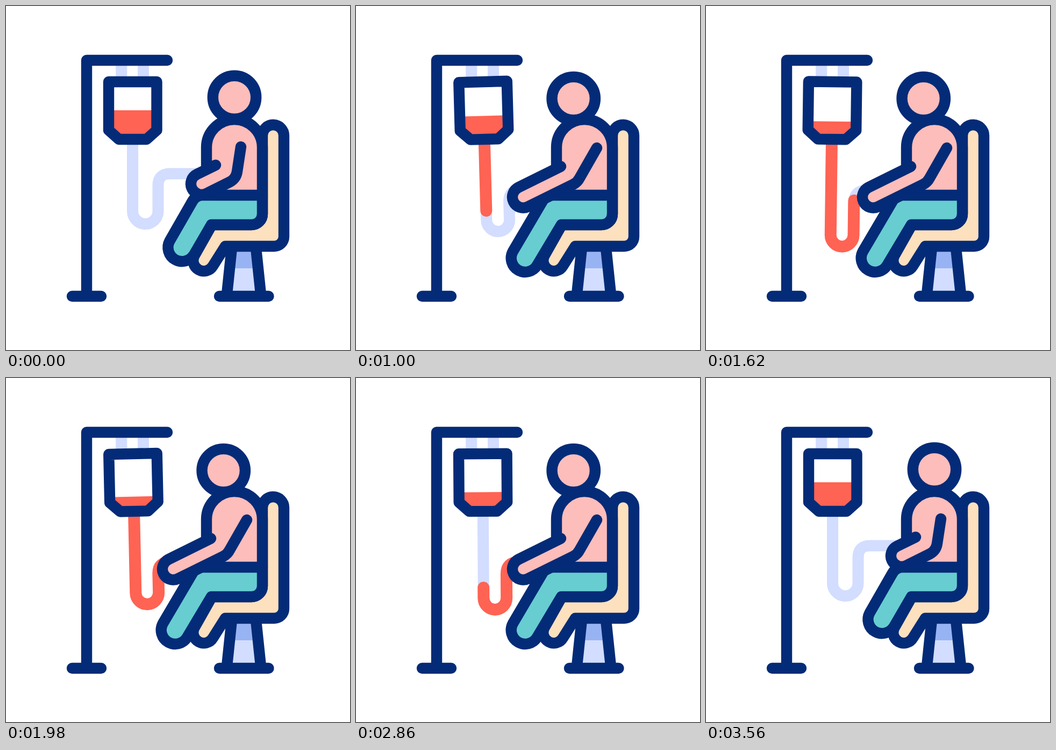
Animation, 640 px wide and 640 px high, one loop 3.6 s. Source, as an HTML page:

```html
<!DOCTYPE html>
<html lang="en">
<head>
<meta charset="utf-8">
<title>Infusion</title>
<style>
  html, body { margin: 0; width: 100%; height: 100%; overflow: hidden; background: #fff; }
  svg { display: block; width: 100vw; height: 100vh; }
  .line { stroke: #042b77; stroke-width: 20.4; stroke-linecap: round; stroke-linejoin: round; fill: none; }
  .pink { fill: #fdbdba; }
  .teal { fill: #67cdd1; }
  .cream { fill: #fde0bd; }
  .hose { fill: none; stroke: #d2ddff; stroke-width: 21; }
  .blood { stroke: #ff6353; stroke-width: 22; stroke-linecap: round; }
</style>
</head>
<body>
<svg viewBox="0 0 640 640">
  <defs>
    <path id="bagShape" d="M191 141H280.5V231L261.5 248H210L191 231Z"/>
    <clipPath id="bagClip"><use href="#bagShape"/></clipPath>
  </defs>

  <path class="hose" d="M214.7 101V145M255.5 101V145"/>
  <path class="line" d="M123 540H177M150 540V101H300"/>

  <path fill="#d2ddff" d="M420 450H465L474 540H411Z"/>
  <path fill="#98b3f3" d="M420 450H465L469 488H416Z"/>
  <path class="line" d="M420 450L411 536M465 450L474 536M397 540H488.5"/>
  <path class="line cream" d="M477 241A20 20 0 0 1 517 241V429A18 18 0 0 1 499 447H408L385 483.5A19.5 19.5 0 0 1 351 463.5L383 407H457A20 20 0 0 0 477 387Z"/>

  <path class="hose" id="tube"/>
  <path class="hose blood" id="flow" pathLength="1"/>

  <g id="bag">
    <use href="#bagShape" fill="#fff"/>
    <g clip-path="url(#bagClip)"><rect id="level" x="180" width="112" height="80" fill="#ff6353"/></g>
    <use href="#bagShape" class="line"/>
  </g>

  <path class="pink" d="M373 298V263A52 52 0 0 1 477 263V352H400L373 320Z"/>
  <path class="line teal" id="leg"/>
  <path class="line" d="M373 298V263A52 52 0 0 1 477 263V352"/>
  <path class="line pink" id="arm"/>
  <circle class="line pink" id="head" r="40.2"/>
</svg>
<script>
const LOOP = 3600, PIVOT = { x: 236, y: 130 };
const el = id => document.getElementById(id);
const set = (id, attrs) => {
  for (const k in attrs) el(id).setAttribute(k, attrs[k]);
};
const mix = (a, b, p) => a + (b - a) * p;
const ramp = (t, from, to) => Math.min(1, Math.max(0, (t - from) / (to - from)));
const ease = (t, from, to) => (1 - Math.cos(Math.PI * ramp(t, from, to))) / 2;

// One wave drives both the swing of the bag and the sag of the tube.
const wave = t => Math.cos(2 * Math.PI * (t - 518) / 1024);

function swing(t) {
  const size = 1.5 + 0.7 * Math.cos(2 * Math.PI * (t - 540) / 2000);
  return size * wave(t) * ease(t, 0, 400) * (1 - ease(t, 2700, 3400));
}

function drawTube(t, deg, p) {
  const a = deg * Math.PI / 180, c = Math.cos(a), s = Math.sin(a);
  const rot = (x, y) => {
    const dx = x - PIVOT.x, dy = y - PIVOT.y;
    return [PIVOT.x + dx * c - dy * s, PIVOT.y + dx * s + dy * c];
  };
  const r = mix(23.75, 21.4, p);
  const left = 235.5, right = left + 2 * r;
  const turn = mix(416, 445 + 14.5 * wave(t), p) - 10.5 - r;
  const top = mix(312, 343, p);
  const corner = rot(right, top);
  const endX = Math.max(mix(360, 310, p), corner[0] + 23);
  const d = `M${rot(left, 245)}L${rot(left, turn)}A${r} ${r} 0 0 0 ${rot(right, turn)}` +
    `L${rot(right, top + 22)}Q${corner} ${corner[0] + 22} ${top}H${endX}`;
  const tail = ramp(t, 2380, 3440);
  const len = ramp(t, 300, 1810) - tail;
  set("tube", { d });
  set("flow", {
    d,
    "stroke-dasharray": `${len} 3`,
    "stroke-dashoffset": -tail,
    visibility: len > 0.001 ? "visible" : "hidden"
  });
}

function drawArm(p) {
  const pt = (x0, y0, x1, y1) => `${mix(x0, x1, p)} ${mix(y0, y1, p)}`;
  const x = mix(364, 311, p), y = mix(331, 355.5, p);
  set("arm", {
    d: `M${pt(390, 296, 381, 298.5)}L${x - 8.8} ${y - 18}A20 20 0 0 0 ${x + 8.8} ${y + 18}` +
      `L${pt(417, 327, 404, 332)}Q${pt(428, 321, 412, 328)} ${pt(430, 308, 416, 320)}` +
      `L${pt(437, 262, 448, 264)}`
  });
}

function drawLeg(p) {
  const x = mix(327, 314.3, p), y = mix(450, 469.7, p);
  set("leg", {
    d: `M477 352H366Q353.5 352 347 363L${x - 22.5} ${y - 13}A26 26 0 0 0 ${x + 22.5} ${y + 13}` +
      `L382 407H457A20 20 0 0 0 477 387V352Z`
  });
}

function drawHead(p) {
  const a = p * 0.288, c = Math.cos(a), s = Math.sin(a);
  set("head", { cx: 422 + 3 * c - 71 * s, cy: 241 - 71 * c - 3 * s });
}

function draw(t) {
  const deg = swing(t);
  const reach = ease(t, 40, 600) - ease(t, 2980, 3520);
  const leanBack = 0.65 * Math.sin(Math.PI * ramp(t, 0, 300)) ** 2;
  set("bag", { transform: `rotate(${deg} ${PIVOT.x} ${PIVOT.y})` });
  set("level", { y: 194 + 28.3 * (ramp(t, 360, 2080) - ease(t, 2430, 3500)) });
  drawTube(t, deg, reach);
  drawArm(reach);
  drawLeg(ease(t, 40, 580) - ease(t, 3100, 3560));
  drawHead(ease(t, 150, 560) - ease(t, 2950, 3450) - leanBack);
}

const start = performance.now();
function tick() {
  draw((performance.now() - start) % LOOP);
  requestAnimationFrame(tick);
}
draw(0);
requestAnimationFrame(tick);
</script>
</body>
</html>
```
